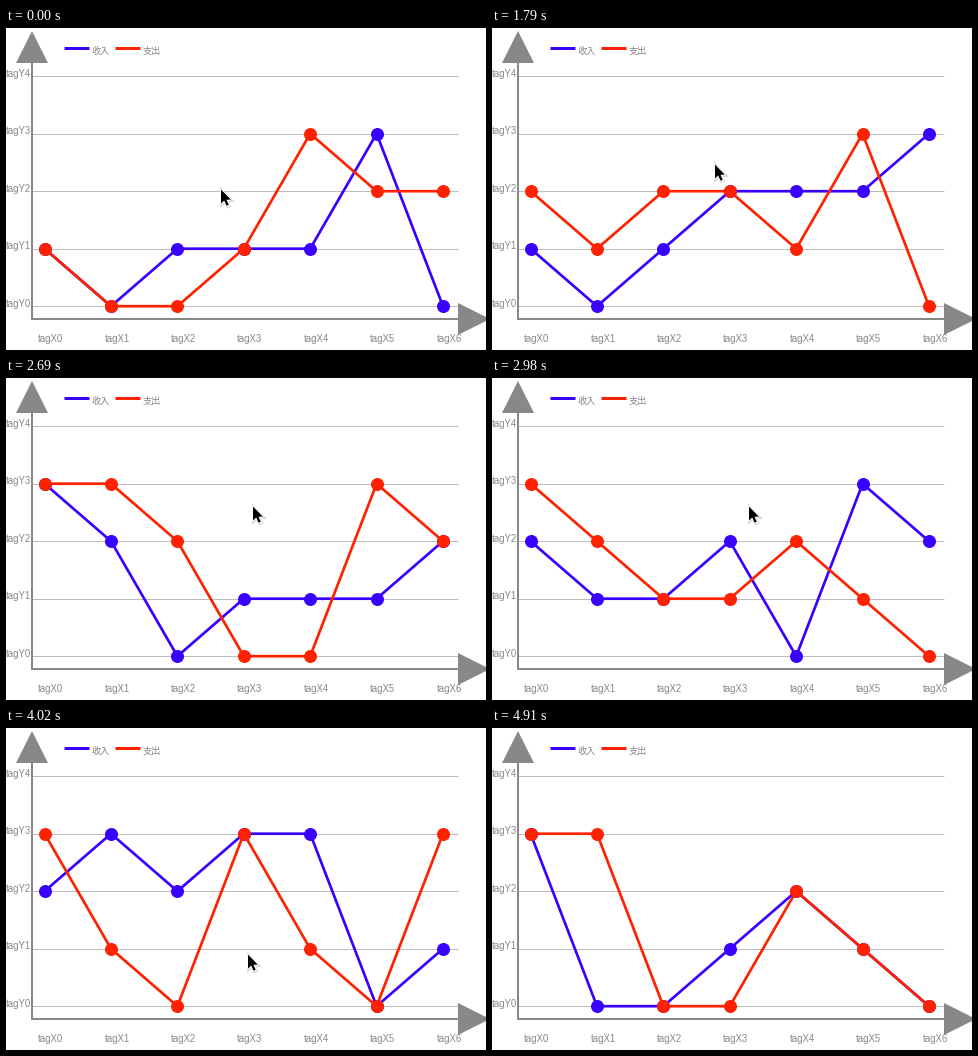
These frames come from a looping animation (480 by 322 pixels, 5220 ms). A matplotlib script:

```python
import matplotlib.pyplot as plt
from matplotlib.animation import FuncAnimation
from matplotlib.patches import Polygon

W, H, DPI = 480, 322, 100
LOOP, STEP = 5220, 20
PX = 72 / DPI  # points per pixel

GRAY, GRID = "#888888", "#bcbcbc"
BLUE, RED = "#3a00ff", "#ff2200"

XS = [38.6 + 66.4 * i for i in range(7)]

# start time, income levels, expense levels
DATA = [
    (0, "1011130", "1001322"),
    (1200, "1012223", "2122130"),
    (2090, "3201112", "3320032"),
    (2840, "2112032", "3211210"),
    (3420, "2323301", "3103103"),
    (4170, "3001210", "3300210"),
]

# start time, left and top of the pointer
POINTER = [
    (0, 213, 160), (1650, 218, 141), (1790, 221, 135), (2540, 241, 128),
    (2690, 245, 127), (2980, 255, 127), (3130, 275, 127), (3570, 293, 130),
    (3720, 275, 155), (3870, 257, 190), (4020, 240, 225), (4470, 256, 229),
    (4610, 428, 309), (4760, 436, 317), (4910, 436, 340),
]
ARROW = [(0, 0), (0, 14), (3.2, 11), (5.5, 16.2), (7.7, 15.3),
         (5.5, 10.3), (9.8, 10.1)]


def level_y(k):
    return 278.2 - 57.5 * k


def at_time(table, t):
    return [row for row in table if row[0] <= t][-1][1:]


fig = plt.figure(figsize=(W / DPI, H / DPI), dpi=DPI, facecolor="white")
ax = fig.add_axes([0, 0, 1, 1])
ax.set_xlim(0, W)
ax.set_ylim(H, 0)
ax.axis("off")


def line(xs, ys, color, width, z, **kw):
    return ax.plot(xs, ys, color=color, lw=width * PX, zorder=z, **kw)[0]


def label(x, y, text, size=9.6, font="Liberation Sans"):
    ax.text(x, y, text, color=GRAY, fontsize=size * PX, family=font,
            ha="left", va="baseline", zorder=2)


def series(color, z):
    return line(XS, XS, color, 2.7, z, marker="o", markersize=13 * PX,
                markeredgewidth=0, solid_joinstyle="round")


def shape(points, z, **kw):
    return ax.add_patch(Polygon(points, closed=True, zorder=z, **kw))


# Grid and axes
for k in range(5):
    y = level_y(k)
    line([26, 452], [y, y], GRID, 1, 1, solid_capstyle="butt")
    label(0, y + 0.4, f"tagY{k}")
for i in range(7):
    label(32 + 66.4 * i, 313.6, f"tagX{i}")
line([26, 26], [34, 292], GRAY, 2, 2, solid_capstyle="butt")
line([25, 453], [291, 291], GRAY, 2, 2, solid_capstyle="butt")
shape([(26, 3), (10, 35), (42, 35)], 2, fc=GRAY, lw=0)
shape([(484, 291), (452, 275), (452, 307)], 2, fc=GRAY, lw=0)

# Legend
for x, color, text in ((58, BLUE, "收入"), (109, RED, "支出")):
    line([x, x + 25], [19.5, 19.5], color, 3, 2, solid_capstyle="butt")
    label(x + 28, 26, text, 9.2, "Noto Sans CJK JP")

income, expense = series(BLUE, 3), series(RED, 4)
layers = [
    (shape(ARROW, 5, fc="black", ec="black", lw=3 * PX, alpha=0.15), 0.7, 0.9),
    (shape(ARROW, 6, fc="white", ec="white", lw=2.2 * PX), 0, 0),
    (shape(ARROW, 7, fc="black", lw=0), 0, 0),
]


def draw(n):
    t = n * STEP + STEP / 2
    for curve, levels in zip((income, expense), at_time(DATA, t)):
        curve.set_ydata([level_y(int(c)) for c in levels])
    left, top = at_time(POINTER, t)
    for patch, dx, dy in layers:
        patch.set_xy([(left + 2 + dx + x, top + 1.5 + dy + y)
                      for x, y in ARROW])
    return [income, expense] + [patch for patch, _, _ in layers]


anim = FuncAnimation(fig, draw, frames=LOOP // STEP, interval=STEP,
                     repeat=True, repeat_delay=0, blit=False)
plt.show()
```
